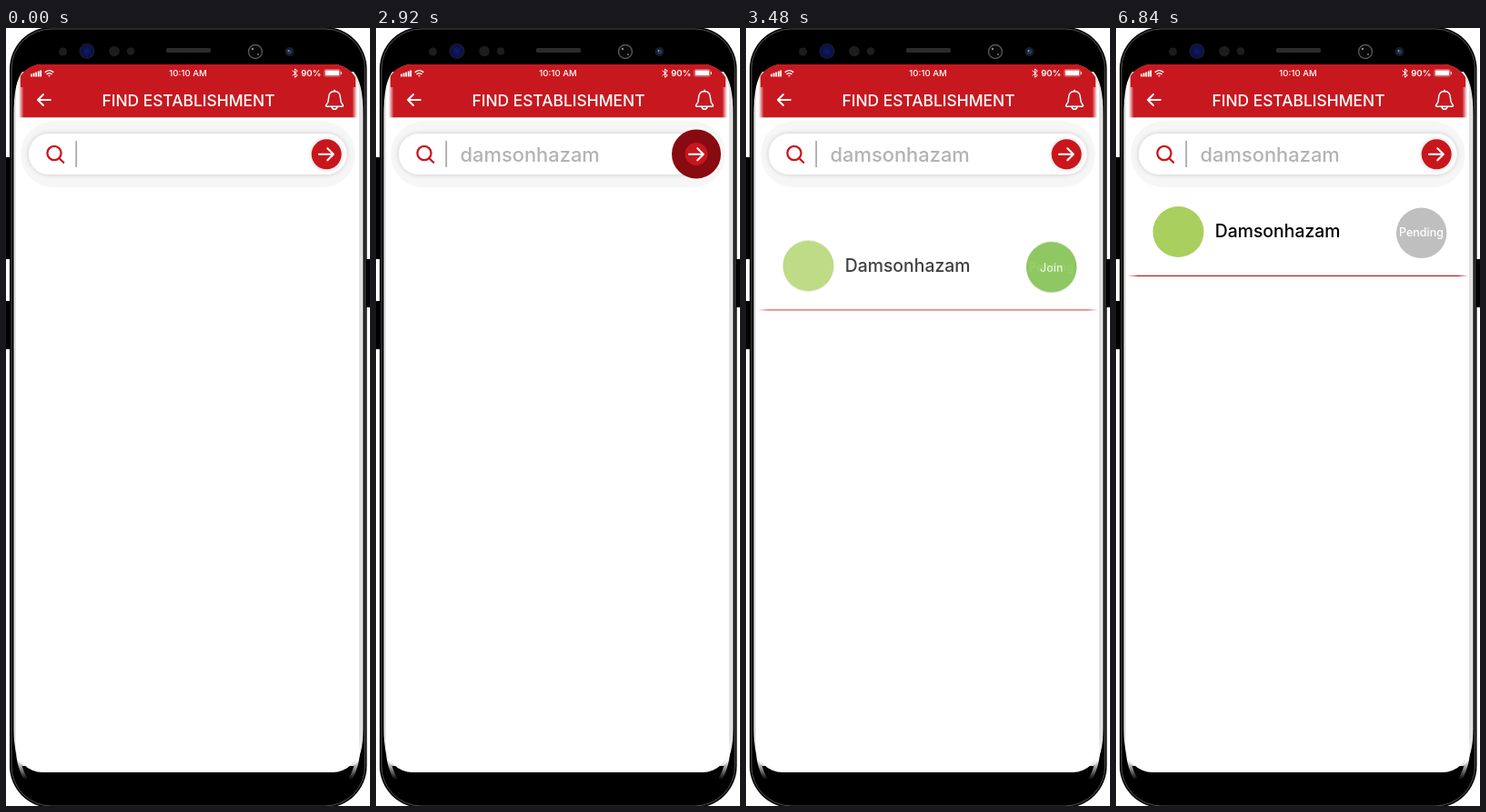
These frames come from a looping animation (400 by 855 pixels, 9080 ms). An HTML page:

```html
<!DOCTYPE html>
<html lang="en">
<head>
<meta charset="utf-8">
<title>Find establishment</title>
<style>
  html, body { margin: 0; width: 100%; height: 100%; overflow: hidden; background: #fff; }
  svg { display: block; width: 400px; height: 855px; }
  text { font-family: Inter, "DejaVu Sans", sans-serif; font-weight: 500; }
  .white { fill: #fff; }
  .line { fill: none; stroke: #fff; stroke-linecap: round; stroke-linejoin: round; }
  .middle { text-anchor: middle; }
  .small { font-size: 9.6px; }
  .label { font-size: 12.5px; fill: #fff; text-anchor: middle; }

  #query, .row, .row > *, .ripple { animation: 9.08s linear infinite; }

  #query { font-size: 21.9px; animation-name: dim; }
  @keyframes dim {
    0% { fill: #000; animation-timing-function: step-end; }
    28.634%, 100% { fill: #b3b3b3; }
  }

  /* The row moves as one; its parts fade separately, so lower layers show through. */
  .row { animation-name: rise; }
  .row > * { opacity: 0; animation-name: fade; }
  .row > .join { animation-name: fade, leave; }
  @keyframes rise {
    0%, 34.361% { transform: translateY(150px); animation-timing-function: steps(12); }
    39.648%, 100% { transform: none; }
  }
  @keyframes fade {
    0%, 34.361% { opacity: 0; animation-timing-function: steps(12); }
    39.648%, 100% { opacity: 1; }
  }
  @keyframes leave {
    0% { visibility: visible; animation-timing-function: step-end; }
    69.163%, 100% { visibility: hidden; }
  }

  /* A solid disc whose centre opens outwards until nothing is left. */
  .ripple { fill: none; stroke: #880b11; stroke-width: 0; animation-name: open; }
  .ripple.late { animation-delay: 3.64s; }
  @keyframes open {
    0% { r: calc(var(--size) / 2); stroke-width: 0; animation-timing-function: step-end; }
    29.075% { r: calc(var(--size) / 2); stroke-width: var(--size); animation-timing-function: step-end; }
    29.515% { r: calc(var(--size) / 2); stroke-width: var(--size); animation-timing-function: steps(13); }
    35.242%, 100% { r: var(--size); stroke-width: 0; }
  }
</style>
</head>
<body>
<svg viewBox="0 0 400 855">
  <defs>
    <linearGradient id="header">
      <stop offset="0" stop-color="#c8181f" stop-opacity="0"/>
      <stop offset=".015" stop-color="#c8181f"/>
      <stop offset=".985" stop-color="#c8181f"/>
      <stop offset="1" stop-color="#c8181f" stop-opacity="0"/>
    </linearGradient>
    <linearGradient id="rule" gradientUnits="userSpaceOnUse" x1="13" x2="387">
      <stop offset="0" stop-color="#c8181f" stop-opacity="0"/>
      <stop offset=".03" stop-color="#c8181f"/>
      <stop offset=".97" stop-color="#c8181f"/>
      <stop offset="1" stop-color="#c8181f" stop-opacity="0"/>
    </linearGradient>
    <radialGradient id="lens">
      <stop offset="0" stop-color="#101b70"/>
      <stop offset=".7" stop-color="#0a1145"/>
      <stop offset="1" stop-color="#1c1c28"/>
    </radialGradient>
    <linearGradient id="shine" x2="0" y2="1">
      <stop offset="0" stop-color="#fff" stop-opacity="0"/>
      <stop offset=".55" stop-color="#fff"/>
      <stop offset="1" stop-color="#fff" stop-opacity="0"/>
    </linearGradient>
    <filter id="shadow" x="-20%" y="-40%" width="140%" height="180%">
      <feDropShadow dx="0" dy="0" stdDeviation="2.5" flood-color="#000" flood-opacity=".2"/>
    </filter>
    <clipPath id="screen"><rect x="11" y="40" width="377" height="778" rx="29"/></clipPath>
  </defs>

  <!-- Phone -->
  <rect x="-2" y="142" width="8" height="112" rx="2"/>
  <rect x="-2" y="300" width="8" height="53" rx="2"/>
  <rect x="394" y="254" width="8" height="53" rx="2"/>
  <rect x="4" y="-1" width="392.5" height="858" rx="46"/>
  <rect x="6" y="1" width="388.5" height="854" rx="44" fill="none" stroke="#666" stroke-width=".8"/>
  <path d="M18 48Q8.5 60 8.5 95V770Q8.5 800 18 811H382Q392.5 800 392.5 770V95Q392.5 60 382 48Z" fill="#e1e1e1"/>
  <g fill="none" stroke="url(#shine)" stroke-width="4">
    <path d="M11.5 778Q12 810 22 826"/>
    <path d="M388.5 778Q388 810 378 826"/>
  </g>
  <rect class="white" x="11" y="40" width="377" height="778" rx="29"/>

  <g fill="#1d1d1d">
    <circle cx="62.5" cy="26" r="4.5"/>
    <circle cx="89" cy="25.5" r="8.5" fill="url(#lens)"/>
    <circle cx="119" cy="25.5" r="5.8"/>
    <circle cx="137" cy="25.5" r="4.3"/>
    <rect x="176" y="22" width="49" height="5" rx="1.5" fill="#2b2b2b"/>
    <circle cx="274" cy="26" r="7.5" fill="#080808" stroke="#555" stroke-width="1.4"/>
    <circle cx="271" cy="23" r="1.2" fill="#888"/>
    <circle cx="277" cy="29" r="1" fill="#777"/>
    <circle cx="311.5" cy="26" r="5"/>
    <circle cx="311.5" cy="26" r="2.6" fill="#163b70"/>
    <circle cx="310.5" cy="25" r=".9" fill="#6e9fd0"/>
  </g>

  <!-- Header -->
  <g clip-path="url(#screen)">
    <rect x="14" y="40" width="372" height="58.3" fill="url(#header)"/>
    <rect x="16" y="40" width="368" height="25" fill="#c8181f"/>
  </g>
  <path d="M28 53.5V50.5M30.6 53.5V49.5M33.2 53.5V48.5M35.8 53.5V47.5M38.2 53.5V46.5" stroke="#fff" stroke-width="1.8"/>
  <g class="line" stroke-width="1.4">
    <path d="M43.2 48.4Q47.5 44.8 51.8 48.4M45 50.6Q47.5 48.6 50 50.6"/>
    <circle cx="47.5" cy="52.6" r=".3"/>
    <path d="M315 47L320.3 52L317.7 54.3V45L320.3 47.3L315 52.2" stroke-width="1"/>
  </g>
  <text class="white small middle" x="200" y="53.3">10:10 AM</text>
  <text class="white small middle" x="335.3" y="52.8" style="font-weight:600">90%</text>
  <rect x="349.8" y="45.6" width="17.4" height="7.6" rx="1.6" fill="none" stroke="#fff" stroke-opacity=".6" stroke-width=".6"/>
  <rect class="white" x="350.8" y="46.5" width="15.4" height="5.8" rx=".8"/>
  <path d="M368.3 48V51" stroke="#fff" stroke-width="1"/>

  <path class="line" stroke-width="2" d="M48.8 79H35M41 73L35 79L41 85"/>
  <text class="white middle" x="200.5" y="86" font-size="17.4">FIND ESTABLISHMENT</text>
  <path class="line" stroke-width="1.5" d="M361 68.2v1.4M352.3 86.2H369.7Q371.2 85.6 369.6 83.8Q367.5 81.5 367.5 77Q367.3 69.7 361 69.5Q354.7 69.7 354.5 77Q354.5 81.5 352.4 83.8Q350.8 85.6 352.3 86.2ZM358 86.5Q358.5 89.3 361 89.3Q363.5 89.3 364 86.5"/>

  <!-- Search field -->
  <rect x="16.5" y="102.5" width="367" height="72.5" rx="35" fill="#f6f6f6"/>
  <rect class="white" x="25" y="116" width="349.5" height="45" rx="22.5" filter="url(#shadow)"/>
  <g fill="none" stroke="#c8181f" stroke-width="2.3" stroke-linecap="round">
    <circle cx="53" cy="137.5" r="7.6"/>
    <path d="M58.6 143.2L63.2 147.8"/>
  </g>
  <path d="M77.2 124V153" stroke="#aaa" stroke-width="1.8"/>
  <text id="query" x="92.5" y="146.7"></text>
  <circle cx="352.2" cy="138.8" r="16.5" fill="#c8181f" filter="url(#shadow)"/>
  <path class="line" stroke-width="2.1" d="M344 138.8H359.8M353.3 132.3L359.8 138.8L353.3 145.3"/>
  <circle class="ripple" cx="352" cy="138.5" style="--size:27px"/>

  <!-- Result -->
  <g class="row">
    <circle cx="68.5" cy="224" r="28" fill="#a9cf5e"/>
    <text x="108.7" y="230.3" font-size="19.4">Damsonhazam</text>
    <circle cx="335.7" cy="225.3" r="27.7" fill="#bfbfbf"/>
    <text class="label" x="335.5" y="229.3">Pending</text>
    <circle class="join" cx="335.7" cy="225.3" r="27.7" fill="#7ac53f"/>
    <text class="label join" x="335.8" y="230">Join</text>
    <path d="M13 272.3H387" stroke="url(#rule)" stroke-width="1.3"/>
  </g>
  <circle class="ripple late" cx="334.8" cy="224.7" style="--size:29.5px"/>
</svg>
<script>
  const LOOP = 9080;
  const NAME = "damsonhazam";
  const query = document.getElementById("query");
  const keyTimes = [...NAME].map((_, i) => 280 + 220 * i + (i % 2) * 20);
  let start;

  function type(now) {
    start ??= now;
    const time = (now - start) % LOOP;
    const typed = NAME.slice(0, keyTimes.filter(key => key <= time).length);
    if (query.textContent !== typed) query.textContent = typed;
    requestAnimationFrame(type);
  }
  requestAnimationFrame(type);
</script>
</body>
</html>
```
